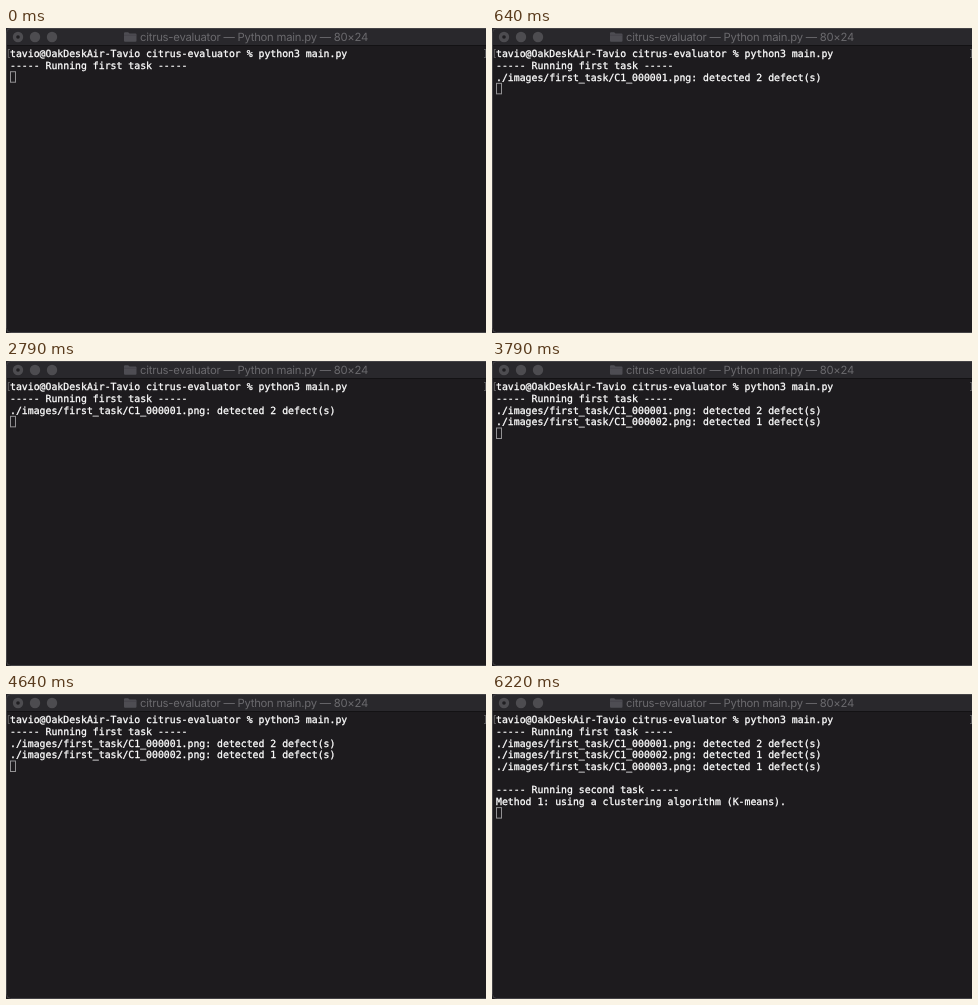
An HTML page that plays this animation: 480x305 px, repeating every 8 s.

```html
<!DOCTYPE html>
<html lang="en">
<head>
<meta charset="utf-8">
<title>Terminal</title>
<style>
  html, body { margin: 0; width: 100%; height: 100%; overflow: hidden; background: #1d1b1e; }
  svg { display: block; width: 100vw; height: 100vh; }
  text { text-rendering: geometricPrecision; white-space: pre; }
  .title { font: 11.3px Inter, Roboto, sans-serif; letter-spacing: -0.24px; fill: #6a696d; }
  .line {
    font: 9.83px "DejaVu Sans Mono", "Liberation Mono", monospace;
    fill: #fff; stroke: #fff; stroke-width: 0.3px;
  }
  .outline { fill: none; stroke: #929193; stroke-width: 1; }
</style>
</head>
<body>
<svg viewBox="0 0 480 305" preserveAspectRatio="none">
  <rect width="480" height="305" fill="#1d1b1e"/>
  <rect width="480" height="17.5" fill="#29282c"/>
  <rect y="17" width="480" height="1" fill="#131214"/>
  <path d="M480 0.5H4.5Q0.5 0.5 0.5 4.5V300.5Q0.5 304.5 4.5 304.5H480" fill="none" stroke="#444346"/>
  <g fill="#4d4c50">
    <circle cx="12" cy="9" r="5.2"/>
    <circle cx="29" cy="9" r="5.2"/>
    <circle cx="46" cy="9" r="5.2"/>
  </g>
  <circle cx="12" cy="9" r="1.8" fill="#1f1e21"/>
  <path d="M118 5.2q0-1 1-1h3.2l1.3 1.3h6q1 0 1 1v6.2q0 1-1 1h-10.5q-1 0-1-1z" fill="#4e4d53"/>
  <path d="M118 7.2h12.5" stroke="#3e3d43" stroke-width="0.6"/>
  <text class="title" x="134" y="13.1">citrus-evaluator — Python main.py — 80×24</text>
  <path class="outline" d="M3.8 21.5H2.3V29.5H3.8M478.2 21.5H479.7V29.5H478.2" opacity="0.6"/>
  <g id="screen"></g>
  <rect id="cursor" class="outline" x="4.5" width="5" height="10.5"/>
</svg>
<script>
  const LOOP = 8000;
  const ROW = 11.65;
  const BASELINE = 29.2;
  const CURSOR_TOP = 20.4;

  const result = (n, defects) =>
    `./images/first_task/C1_00000${n}.png: detected ${defects} defect(s)`;
  const heading = task => `----- Running ${task} task -----`;

  // Each entry: time it is printed, text
  const output = [
    [0, "tavio@OakDeskAir-Tavio citrus-evaluator % python3 main.py"],
    [0, heading("first")],
    [500, result(1, 2)],
    [2930, result(2, 1)],
    [5500, result(3, 1)],
    [6220, ""],
    [6220, heading("second")],
    [6220, "Method 1: using a clustering algorithm (K-means)."]
  ];

  const screen = document.getElementById("screen");
  const cursor = document.getElementById("cursor");

  const lines = output.map(([, content], row) => {
    const line = document.createElementNS("http://www.w3.org/2000/svg", "text");
    line.setAttribute("class", "line");
    line.setAttribute("x", 4);
    line.setAttribute("y", BASELINE + row * ROW);
    line.textContent = content;
    return screen.appendChild(line);
  });

  function render(time) {
    const printed = output.filter(([at]) => at <= time).length;
    lines.forEach((line, row) => {
      line.style.display = row < printed ? "" : "none";
    });
    cursor.setAttribute("y", CURSOR_TOP + printed * ROW);
  }

  const start = performance.now();
  function tick() {
    render((performance.now() - start) % LOOP);
    requestAnimationFrame(tick);
  }
  tick();
</script>
</body>
</html>
```
